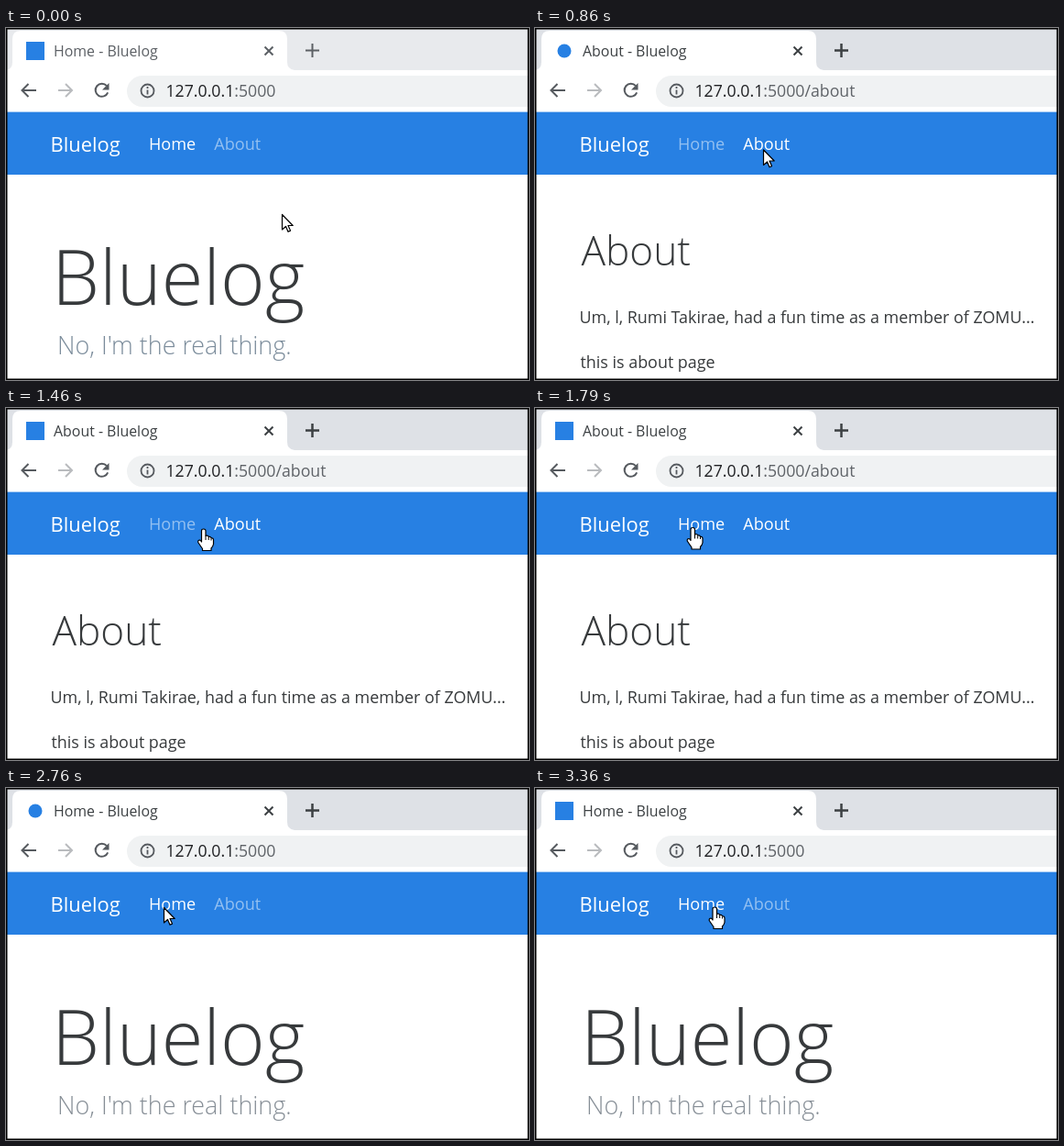
Animation, 571 px wide and 384 px high, one loop 3420 ms. Source, as an HTML page with a canvas:

```html
<!DOCTYPE html>
<html lang="en">
<head>
<meta charset="utf-8">
<title>Bluelog</title>
<style>
  html, body { margin: 0; width: 100%; height: 100%; overflow: hidden; background: #fff; }
  canvas { display: block; width: 571px; height: 384px; }
</style>
</head>
<body>
<canvas id="stage" width="571" height="384"></canvas>
<script>
const ctx = document.getElementById('stage').getContext('2d');
const LOOP = 3420;
const BLUE = '#2780e3', INK = '#373a3c', ICON = '#565a5f';
const CLICK_ABOUT = 730, SHOW_ABOUT = 860, CLICK_HOME = 2530, SHOW_HOME = 2760;
const CLICK_LENGTH = 130, ARROW_LENGTH = 70;

// Each move jumps through a few eased positions.
const MOVES = [
  { start: 60, end: 330, steps: 5, from: [301.5, 203.5], to: [249.5, 133] },
  { start: 1330, end: 1790, steps: 8, from: [249.5, 133], to: [172.5, 130.5] },
  { start: 3220, end: 3360, steps: 3, from: [172.5, 130.5], to: [196.5, 130] }
];

// Half size and corner radius of the tab icon as a page finishes loading.
const ICON_STAGES = [[0, 7.5, 7.5], [70, 9, 9], [130, 10, 9], [200, 10, 5], [270, 10, 0]];

function text(string, x, y, size, color, weight = 400) {
  ctx.font = `${weight} ${size}px "Open Sans", "Noto Sans", sans-serif`;
  ctx.fillStyle = color;
  ctx.fillText(string, x, y);
  return x + ctx.measureText(string).width;
}

function rect(x, y, w, h, color) {
  ctx.fillStyle = color;
  ctx.fillRect(x, y, w, h);
}

function rounded(x, y, w, h, radius, color) {
  ctx.beginPath();
  ctx.roundRect(x, y, w, h, radius);
  ctx.fillStyle = color;
  ctx.fill();
}

function disc(x, y, radius, color) {
  ctx.beginPath();
  ctx.arc(x, y, radius, 0, Math.PI * 2);
  ctx.fillStyle = color;
  ctx.fill();
}

function stroke(path, color, width = 2) {
  ctx.strokeStyle = color;
  ctx.lineWidth = width;
  ctx.stroke(new Path2D(path));
}

function pointerAt(t) {
  let point = MOVES[0].from;
  for (const { start, end, steps, from, to } of MOVES) {
    if (t < start) break;
    const step = Math.floor((t - start) / (end - start) * (steps - 1) + 0.1) + 1;
    const k = Math.min(1, step / steps);
    const eased = k * (1.25 - 0.25 * k);
    point = from.map((v, i) => v + (to[i] - v) * eased);
  }
  return point.map(v => Math.round(v * 2) / 2);
}

function drawTab(title, active, half, corner) {
  rect(0, 0, 571, 46, active ? '#dee1e6' : '#e8eaed');
  ctx.fillStyle = '#fff';
  ctx.fill(new Path2D('M0 46 Q7 45 7 37 V12 Q7 3 16 3 H298 Q307 3 307 12 V37 Q307 45 315 46 Z'));
  rounded(32 - half, 25 - half, half * 2, half * 2, corner, BLUE);
  const color = active ? '#3c4043' : '#5c6065';
  text(title, 52, 31, 15.9, color);
  stroke('M282.5 20.5 l9 9 m0 -9 l-9 9', color);
  stroke('M327 24.5 h15 m-7.5 -7.5 v15', color, active ? 2.5 : 2);
}

function drawToolbar(path) {
  rect(0, 46, 571, 46, '#fff');
  rounded(132, 52, 460, 34, 17, '#f0f2f3');
  stroke('M33 68 H17.5 m7 -7 l-7 7 l7 7', ICON);
  stroke('M57 68 H72 m-7 -7 l7 7 l-7 7', '#b9bbbe');
  stroke('M110 63.2 A7 7 0 1 0 111.2 70.3', ICON);
  ctx.fillStyle = ICON;
  ctx.fill(new Path2D('M112.5 60 v7.5 h-7.5 Z'));
  stroke('M147.5 68.5 a7 7 0 1 0 14 0 a7 7 0 1 0 -14 0 M154.5 67.5 v5 M154.5 64 v2', ICON, 1.8);
  const x = text('127.0.0.1', 174.5, 75, 17.7, '#202124');
  text(':5000' + path, x, 75, 17.7, '#5f6368');
}

function drawNav(homeLit, aboutLit) {
  const link = lit => lit ? '#fff' : 'rgba(255,255,255,.5)';
  rect(0, 91.6, 571, 68.4, BLUE);
  text('Bluelog', 48.5, 135, 21.9, '#fff', 500);
  text('Home', 156, 133, 18.1, link(homeLit));
  text('About', 227.3, 133, 18.1, link(aboutLit));
}

function drawHome(muted) {
  text('Bluelog', 50, 302, 83, INK, 300);
  text("No, I'm the real thing.", 56, 356, 26.9, muted, 300);
}

function drawAbout() {
  text('About', 50.5, 259, 44.2, INK, 300);
  text('Um, l, Rumi Takirae, had a fun time as a member of ZOMU...', 48.5, 322, 17.9, INK);
  text('this is about page', 49.5, 371, 17.9, INK);
}

function drawPointer([x, y], hand) {
  ctx.save();
  ctx.translate(x, y);
  ctx.lineJoin = 'round';
  const shape = hand
    ? 'M-2.5 2 Q-2.5 0 -.2 0 Q2 0 2 2 V7.5 Q4.5 6.5 5.2 8.6 Q7.4 7.8 8 10 Q10.5 9.6 10.5 12 V16.5 Q10 19 8 21 V23.5 H-1.5 V21.5 Q-4 18 -6.3 14.5 Q-6.5 12 -4.5 12 Q-3.5 12.4 -2.5 14 Z'
    : 'M0 0 V16.5 L4 13 L6.5 18.8 L9 17.6 L6.5 12 H11.7 Z';
  ctx.fillStyle = '#fff';
  ctx.fill(new Path2D(shape));
  stroke(shape, '#000', 1.2);
  if (hand) stroke('M2 7.5 V12 M5.2 9 V12 M8 10.5 V12.5', '#000', 1);
  ctx.restore();
}

function draw(t) {
  const within = (start, length) => t >= start && t < start + length;
  const onAbout = t >= SHOW_ABOUT && t < SHOW_HOME;
  const shownAt = t >= SHOW_HOME ? SHOW_HOME : t >= SHOW_ABOUT ? SHOW_ABOUT : -LOOP;
  const [, half, corner] = ICON_STAGES.findLast(stage => t - shownAt >= stage[0]);

  const pointer = pointerAt(t);
  const reloading = t - shownAt < ARROW_LENGTH;
  const overNav = pointer[1] < 147;
  const overHome = overNav && pointer[0] < 215;
  const hand = overNav && !reloading;

  drawTab(`${onAbout ? 'About' : 'Home'} - Bluelog`, t >= CLICK_ABOUT, half, corner);
  drawToolbar(onAbout ? '/about' : '');
  rect(0, 160, 571, 224, '#fff');
  drawNav(!onAbout || overHome, onAbout || (overNav && !overHome));
  if (onAbout) drawAbout();
  else drawHome(t < SHOW_ABOUT ? '#7b8c9b' : '#868e96');

  drawPointer(pointer, hand);
  if (within(CLICK_ABOUT, CLICK_LENGTH) || within(CLICK_HOME, CLICK_LENGTH)) {
    disc(pointer[0] - 1.5, pointer[1] - 0.5, 15.5, 'rgba(255,255,0,.5)');
  }

  ctx.strokeStyle = '#000';
  ctx.lineWidth = 1.5;
  ctx.strokeRect(0.75, 0.75, 569.5, 382.5);
}

const began = performance.now();
function tick() {
  draw((performance.now() - began) % LOOP);
  requestAnimationFrame(tick);
}
tick();
</script>
</body>
</html>
```
